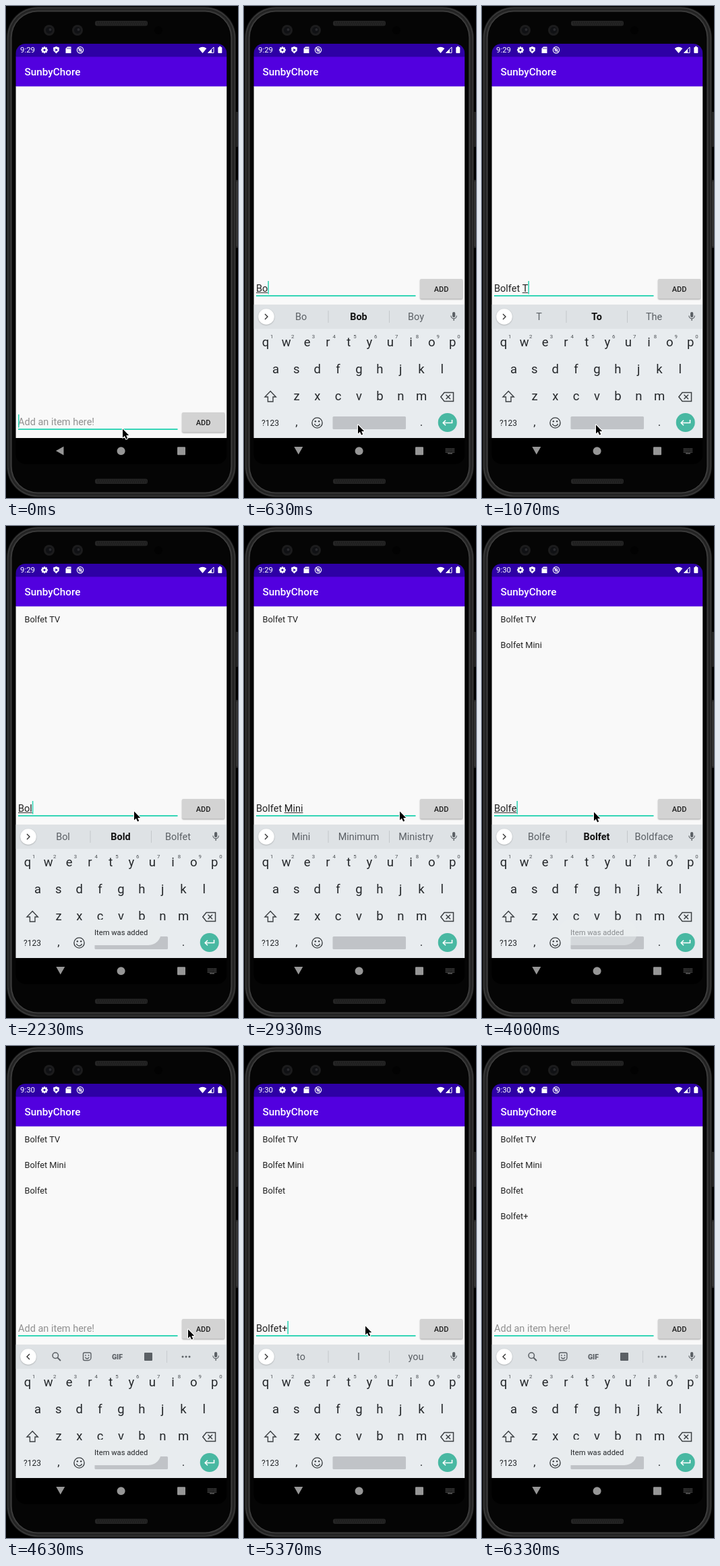
Animation of 344x730 px, one loop 6360 ms. Source, as an HTML page with a canvas:

```html
<!DOCTYPE html>
<html lang="en">
<head>
<meta charset="utf-8">
<title>To-do list demo</title>
<style>
html, body { margin: 0; width: 100%; height: 100%; overflow: hidden; background: #000; }
canvas { display: block; width: 344px; height: 730px; }
</style>
</head>
<body>
<canvas id="stage"></canvas>
<script>
const W = 344, H = 730, LOOP = 6360;
const canvas = document.getElementById('stage');
const dpr = window.devicePixelRatio || 1;
canvas.width = W * dpr;
canvas.height = H * dpr;
const c = canvas.getContext('2d');

const TEAL = '#35d5b6', INK = '#25282b', GREY = '#5b6065';
const FONT = 'Roboto, "Open Sans", sans-serif';
const LEFT = 14.6, WIDE = 312.6;

// Each entry: text, first key time, time per key, time of the ADD click
const entries = [
  { text: 'Bolfet TV', start: 560, step: 70, click: 1640 },
  { text: 'Bolfet Mini', start: 2080, step: 63, click: 3120 },
  { text: 'Bolfet', start: 3700, step: 65, click: 4440 },
  { text: 'Bolfet+', start: 4900, step: 65, click: 5640 }
];

const hints = {
  B: 'B But Be', Bo: 'Bo Bob Boy', Bol: 'Bol Bold Bolfet', Bolf: 'Bolf Bold Bolt',
  Bolfe: 'Bolfe Bolfet Boldface', Bolfet: 'Bolfet Bolfets Buffet',
  T: 'T To The', TV: "TV TVs TV's",
  M: 'M My Me', Mi: 'Mi Mine Mild', Min: 'Min Mine Mind', Mini: 'Mini Minimum Ministry'
};
const complete = ['Bolfet', 'TV', 'Mini'];

// Pointer path: time, x, y
const path = [
  [0, 173, 628], [200, 173, 621], [600, 169, 622], [1270, 169, 622],
  [1560, 275, 420], [1760, 275, 420], [2140, 190, 424], [2780, 190, 424],
  [2930, 231, 424], [3050, 272, 421], [3340, 270, 421], [3600, 166, 425],
  [4230, 166, 425], [4390, 274, 422], [4640, 270, 421], [4900, 180, 416],
  [5370, 180, 416], [5560, 274, 420], [5950, 274, 420], [6060, 282, 416]
];

const clamp = v => Math.max(0, Math.min(1, v));
const ease = v => v * v * (3 - 2 * v);

function box(x, y, w, h, r, fill) {
  c.beginPath();
  c.roundRect(x, y, w, h, r);
  c.fillStyle = fill;
  c.fill();
}
function disc(x, y, r, fill) {
  c.beginPath();
  c.arc(x, y, r, 0, Math.PI * 2);
  c.fillStyle = fill;
  c.fill();
}
function ring(x, y, r, color, width) {
  c.beginPath();
  c.arc(x, y, r, 0, Math.PI * 2);
  c.strokeStyle = color;
  c.lineWidth = width;
  c.stroke();
}
function label(s, x, y, size, color, align = 'left', weight = 400) {
  c.font = `${weight} ${size}px ${FONT}`;
  c.textAlign = align;
  c.fillStyle = color;
  c.fillText(s, x, y);
}
function shape(points, fill) {
  c.beginPath();
  points.forEach(([x, y]) => c.lineTo(x, y));
  c.closePath();
  c.fillStyle = fill;
  c.fill();
}
function line(points, color, width, closed) {
  c.beginPath();
  points.forEach(([x, y]) => c.lineTo(x, y));
  if (closed) c.closePath();
  c.strokeStyle = color;
  c.lineWidth = width;
  c.stroke();
}
function shadow(color, blur, dy) {
  c.shadowColor = color;
  c.shadowBlur = blur * dpr;
  c.shadowOffsetY = dy * dpr;
}

function stateAt(t) {
  const s = { text: '', lastKey: 0, items: [], press: 0, toast: 0 };
  for (const e of entries) {
    if (t >= e.click) {
      s.items.push(e.text);
      s.text = '';
      s.lastKey = e.click;
    } else if (t >= e.start) {
      const n = Math.min(e.text.length, Math.floor((t - e.start) / e.step) + 1);
      s.text = e.text.slice(0, n);
      s.lastKey = e.start + (n - 1) * e.step;
    }
    const since = t - e.click;
    if (since > -50 && since < 170) s.press = since < 30 ? 1 : 1 - (since - 30) / 140;
    if (since > 40 && since < 930) {
      s.toast = Math.min(clamp((since - 40) / 70), clamp((930 - since) / 100));
    }
  }
  return s;
}

function speaker(y) {
  box(132, y, 78, 7.5, 3, '#252525');
  for (let x = 135; x < 209; x += 3) line([[x, y + 1], [x + 2, y + 6.5]], '#171717', 0.8);
}

// Concentric rim of the phone body
function rim(inset, color) {
  box(1 + inset, 1 + inset, 340 - 2 * inset, 728 - 2 * inset, 46 - inset, color);
}

function phone() {
  c.fillStyle = '#000';
  c.fillRect(0, 0, W, H);
  box(340, 157, 4, 52, 1, '#242424');
  box(340, 258, 4, 101, 1, '#242424');
  box(341.5, 260, 1.5, 97, 1, '#3c3c3c');
  rim(0, '#1b1b1b');
  rim(1.2, '#3a3a3a');
  rim(2.6, '#222');
  rim(5, '#2e2e2e');
  rim(6.4, '#444');
  rim(7.6, '#050505');
  speaker(22);
  speaker(701.5);
  for (const x of [64, 106]) {
    disc(x, 36, 8, '#1c1c1d');
    disc(x, 36, 5, '#101114');
    disc(x + 1.5, 35, 2, '#29292e');
  }
  disc(226, 36, 6, '#020202');
}

function statusBar(t) {
  box(LEFT, 56, WIDE, 20, [14, 14, 0, 0], '#2e00a5');
  c.fillStyle = '#5200df';
  c.fillRect(LEFT, 75.4, WIDE, 43.9);
  label(t < 3600 ? '9:29' : '9:30', 21, 69.3, 11.4, '#fff');
  label('SunbyChore', 27.5, 103, 15.3, '#fff', 'left', 500);

  // gear
  for (let i = 0; i < 8; i++) {
    c.save();
    c.translate(57, 65.3);
    c.rotate(i * Math.PI / 4);
    box(-1.2, -5, 2.4, 3, 0.5, '#fff');
    c.restore();
  }
  ring(57, 65.3, 2.7, '#fff', 2);
  // shield
  shape([[74.5, 60], [79, 61.8], [78.6, 66.5], [74.5, 70.5], [70.4, 66.5], [70, 61.8]], '#fff');
  shape([[73.3, 63], [77, 65.2], [73.3, 67.4]], '#2e00a5');
  // storage card
  shape([[91, 60.5], [96.5, 60.5], [96.5, 70], [88.5, 70], [88.5, 63]], '#fff');
  for (const x of [91, 93, 95]) line([[x, 62], [x, 64]], '#2e00a5', 0.8);
  // struck circle
  ring(110, 65.2, 4.6, '#fff', 1.2);
  ring(110, 65.2, 1.9, '#fff', 1.1);
  line([[106.8, 62], [113.2, 68.4]], '#fff', 1.1);
  // wifi, signal, battery
  c.beginPath();
  c.moveTo(291.5, 70);
  c.lineTo(285.6, 63);
  c.quadraticCurveTo(291.5, 58.5, 297.4, 63);
  c.fillStyle = '#fff';
  c.fill();
  line([[308, 61], [308, 69.4], [299.6, 69.4]], '#fff', 1, true);
  shape([[305, 64], [305, 69.6], [299.4, 69.6]], '#fff');
  box(314.3, 61, 6, 9, 1, '#fff');
  box(316, 59.8, 2.6, 2, 0, '#fff');
}

function app(t, s, open) {
  c.fillStyle = '#f9f9f9';
  c.fillRect(LEFT, 119, WIDE, 522);
  s.items.forEach((item, i) => label(item, 27.5, 143 + 38.1 * i, 12.8, '#212121'));

  const y = open ? 405 : 603;
  if (s.text) label(s.text, 18, y + 18.5, 14.5, '#212121');
  else label('Add an item here!', 18, y + 18.5, 14.5, '#909090');
  c.fillStyle = TEAL;
  c.fillRect(18, y + 24, 236.5, 2);

  const measure = str => {
    c.font = `400 14.5px ${FONT}`;
    return c.measureText(str).width;
  };
  const word = s.text.split(' ').pop();
  const end = 18 + measure(s.text);
  if (word && !word.endsWith('+')) {
    const from = 18 + measure(s.text.slice(0, s.text.length - word.length));
    line([[from, y + 20.5], [end, y + 20.5]], '#333', 1);
  }
  if ((t - s.lastKey) % 380 < 190) {
    c.fillStyle = TEAL;
    c.fillRect(end, y + 3, 1.6, 19.5);
  }

  c.save();
  shadow('rgba(0,0,0,.35)', 2, 1);
  box(261, y, 63.3, 29.5, 2, '#d3d3d3');
  c.restore();
  if (s.press > 0) {
    c.globalAlpha = s.press;
    box(261, y, 63.3, 29.5, 2, '#b9b9b9');
    c.globalAlpha = 1;
  }
  label('ADD', 292.6, y + 18.8, 11, '#1e1e1e', 'center', 500);
}

function strip(s) {
  c.fillStyle = '#dee2e5';
  c.fillRect(LEFT, 443, WIDE, 36);
  c.save();
  shadow('rgba(0,0,0,.25)', 2, 0.7);
  disc(33, 461, 11.8, '#fff');
  c.restore();
  const d = s.text ? 2 : -2;
  line([[33 - d, 457], [33 + d, 461], [33 - d, 465]], '#333', 1.4);

  // microphone
  box(309, 454, 4.2, 8, 2.1, GREY);
  c.beginPath();
  c.arc(311.1, 459.6, 4.2, 0, Math.PI);
  c.strokeStyle = GREY;
  c.lineWidth = 1.2;
  c.stroke();
  line([[311.1, 464], [311.1, 467]], GREY, 1.3);

  if (s.text) {
    const word = s.text.split(' ').pop();
    const known = hints[word];
    const words = (known || 'to I you').split(' ');
    const strong = known && !complete.includes(word);
    words.forEach((w, i) => {
      const bold = strong && i === 1;
      label(w, [84.5, 170, 255][i], 466, 14.4, bold ? '#111' : GREY, 'center', bold ? 700 : 400);
    });
    for (const x of [125, 215.5]) line([[x, 452], [x, 470]], '#c3c7ca', 1);
    return;
  }
  // search
  ring(73.3, 459.3, 4.2, GREY, 1.5);
  line([[76.5, 462.5], [81, 467]], GREY, 1.8);
  // sticker
  c.beginPath();
  c.roundRect(114.5, 455, 11.5, 11.5, [2, 2, 4, 2]);
  c.strokeStyle = GREY;
  c.lineWidth = 1.4;
  c.stroke();
  disc(118, 459, 0.9, GREY);
  disc(122.5, 459, 0.9, GREY);
  c.beginPath();
  c.arc(120.2, 461, 2.8, 0.2, Math.PI - 0.2);
  c.stroke();
  label('GIF', 165, 464.8, 10.5, GREY, 'center', 900);
  box(205, 455, 12, 12, 1, GREY);
  line([[238.5, 452], [238.5, 470]], '#c8ccd0', 1);
  for (const x of [262, 267, 272]) disc(x, 461, 1.5, GREY);
}

function keyRow(keys, x, y, step) {
  [...keys].forEach((k, i) => label(k, x + i * step, y, 18.5, INK, 'center'));
}

function keyboard(s) {
  c.fillStyle = '#e8ecef';
  c.fillRect(LEFT, 443, WIDE, 198);
  strip(s);
  keyRow('qwertyuiop', 32, 504.5, 30.8);
  [...'1234567890'].forEach((n, i) => label(n, 41.3 + i * 30.8, 492.5, 7.8, '#4a4e52', 'center'));
  keyRow('asdfghjkl', 47, 544.5, 30.85);
  keyRow('zxcvbnm', 78, 585, 30.85);

  // shift
  line([[39.2, 571.5], [47.3, 580], [43, 580], [43, 587], [35.4, 587], [35.4, 580], [31, 580]], '#3c4043', 1.4, true);
  // delete
  line([[291.8, 580], [297, 573.5], [310.5, 573.5], [310.5, 586.5], [297, 586.5]], '#3c4043', 1.5, true);
  line([[299.5, 576.7], [306, 583.2]], '#3c4043', 1.4);
  line([[306, 576.7], [299.5, 583.2]], '#3c4043', 1.4);

  label('?123', 39, 623, 12, INK, 'center');
  label(',', 78, 623, 17, INK, 'center');
  label('.', 263, 623, 17, INK, 'center');
  // smiley
  ring(108.5, 618.5, 7.6, '#3c4043', 1.4);
  disc(105.8, 616.3, 1.2, '#3c4043');
  disc(111.2, 616.3, 1.2, '#3c4043');
  c.beginPath();
  c.arc(108.5, 619, 4, 0.2, Math.PI - 0.2);
  c.strokeStyle = '#3c4043';
  c.lineWidth = 1.4;
  c.stroke();
  box(131.5, 609, 108.5, 19, 1.5, '#c0c3c7');
  // enter
  disc(301.7, 618, 14, '#48b8a2');
  line([[308.5, 614], [308.5, 618.5], [295.5, 618.5]], '#fff', 1.6);
  line([[299, 614.7], [295.2, 618.5], [299, 622.3]], '#fff', 1.6);
}

function navBar(open) {
  const grey = '#969696';
  box(LEFT, 641, WIDE, 38.5, [0, 0, 14, 14], '#000');
  if (open) shape([[74.3, 654], [87.3, 654], [80.8, 665.5]], grey);
  else shape([[85.5, 653.5], [85.5, 666.5], [74, 660]], grey);
  disc(170.6, 660.2, 6, grey);
  box(254, 654.3, 12, 12, 1, grey);
  if (open) {
    for (let r = 0; r < 3; r++) {
      for (let i = 0; i < 6; i++) box(299 + i * 2.3, 656.5 + r * 2.3, 1.3, 1.3, 0, '#7c7c7c');
    }
    box(302, 663.3, 7, 1.2, 0, '#7c7c7c');
  }
}

function toast(alpha) {
  if (alpha <= 0) return;
  c.globalAlpha = alpha;
  box(112, 584, 118, 38, 19, '#e8ecee');
  label('Item was added', 170.6, 607, 11.2, '#24272a', 'center');
  c.globalAlpha = 1;
}

function pointer(t) {
  if (t > 6060) return;
  let i = 0;
  while (i < path.length - 2 && t >= path[i + 1][0]) i++;
  const [t0, x0, y0] = path[i], [t1, x1, y1] = path[i + 1];
  const k = ease(clamp((t - t0) / (t1 - t0)));
  const x = x0 + (x1 - x0) * k, y = y0 + (y1 - y0) * k;
  const arrow = [[0, 0], [0, 13], [2.9, 10.3], [5.1, 15], [7.2, 14], [5.2, 9.5], [9.2, 9.5]]
    .map(([dx, dy]) => [x + dx, y + dy - 0.5]);
  c.lineJoin = 'round';
  line(arrow, '#fff', 2.2, true);
  shape(arrow, '#000');
  c.lineJoin = 'miter';
}

function draw(t) {
  const s = stateAt(t);
  const open = t >= 280;
  c.setTransform(dpr, 0, 0, dpr, 0, 0);
  phone();
  app(t, s, open);
  statusBar(t);
  if (open) {
    const k = 1 - clamp((t - 280) / 130);
    c.save();
    c.beginPath();
    c.rect(LEFT, 119, WIDE, 522);
    c.clip();
    c.translate(0, 198 * k * k);
    keyboard(s);
    c.restore();
  }
  navBar(open);
  toast(s.toast);
  pointer(t);
}

const begin = performance.now();
function tick() {
  draw((performance.now() - begin) % LOOP);
  requestAnimationFrame(tick);
}
tick();
</script>
</body>
</html>
```
